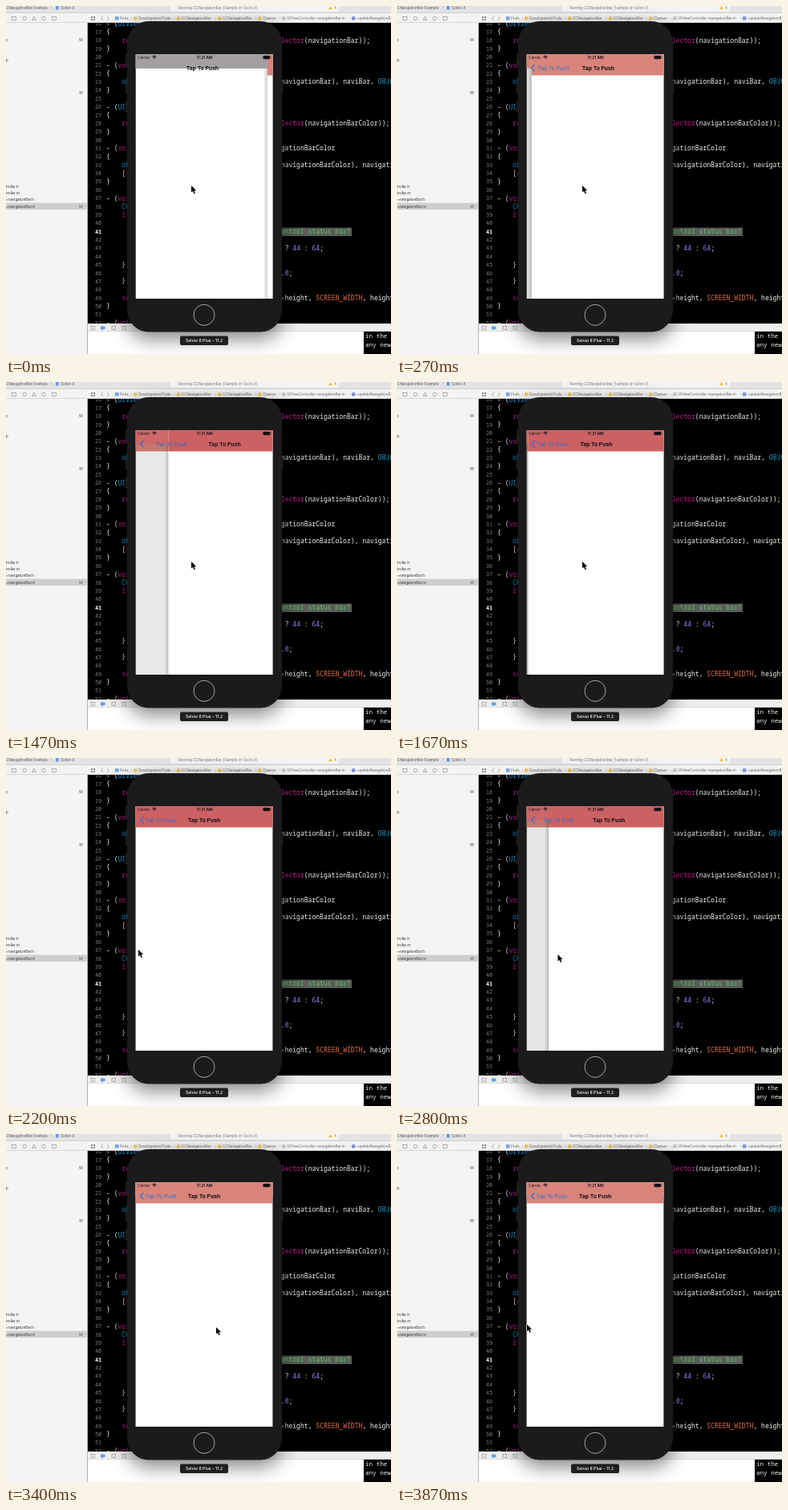
Write an HTML page with a canvas that moves like this. It is 480 by 434 pixels and loops after 4070 ms.

```html
<!DOCTYPE html>
<html lang="en">
<head>
<meta charset="utf-8">
<title>Navigation bar demo</title>
<style>
html, body { margin: 0; width: 100%; height: 100%; overflow: hidden; background: #fff; }
canvas { display: block; width: 480px; height: 434px; }
</style>
</head>
<body>
<canvas id="stage"></canvas>
<script>
const canvas = document.getElementById('stage');
const ctx = canvas.getContext('2d');
const dpr = window.devicePixelRatio || 1;
canvas.width = 480 * dpr;
canvas.height = 434 * dpr;

const LOOP = 4070, FPS = 15;
const SANS = 'Inter, "Liberation Sans", sans-serif';
const MONO = '"Noto Sans Mono", "DejaVu Sans Mono", monospace';
const SCREEN = { x: 161.5, y: 60, w: 171, h: 305 };
const SHARED_H = 18;
const BARS = [
  { color: '#a1a1a1', h: SHARED_H },
  { color: '#d9847b', h: 26.5 },
  { color: '#cc6163', h: 26.5 }
];
const BLUE = '#2b6fd0';
const CELL = 4.84, ROW = 10.37;

const CODE = [
  '- (UIView *)navigationBar', '{',
  '    return objc_getAssociatedObject(self, @selector(navigationBar));', '}', '',
  '- (void)setNavigationBar:(UIView *)naviBar', '{',
  '    objc_setAssociatedObject(self, @selector(navigationBar), naviBar, OBJC_ASSOCIATION_RETAIN);', '}', '',
  '- (UIColor *)navigationBarColor', '{',
  '    return objc_getAssociatedObject(self, @selector(navigationBarColor));', '}', '',
  '- (void)setNavigationBarColor:(UIColor *)navigationBarColor', '{',
  '    objc_setAssociatedObject(self, @selector(navigationBarColor), navigationBarColor);',
  '    [self updateNavigationBar];', '}', '',
  '- (void)updateNavigationBar', '    CGFloat height = 0;', '    if (self) {', '',
  ' '.repeat(41) + '// control status bar!', '',
  ' '.repeat(46) + '? 44 : 64;', '', '    }',
  ' '.repeat(44) + '0.0;', '    }', '',
  '    self' + ' '.repeat(37) + '-height, SCREEN_WIDTH, height);', '}', '',
  '- (void)viewDidLoad'
];

const clamp = v => Math.max(0, Math.min(1, v));

function rect(x, y, w, h, color) {
  ctx.fillStyle = color;
  ctx.fillRect(x, y, w, h);
}

function round(x, y, w, h, r, color) {
  ctx.fillStyle = color;
  ctx.beginPath();
  ctx.roundRect(x, y, w, h, r);
  ctx.fill();
}

function line(points, color, width = 1) {
  ctx.strokeStyle = color;
  ctx.lineWidth = width;
  ctx.beginPath();
  points.forEach(([x, y]) => ctx.lineTo(x, y));
  ctx.stroke();
}

function ring(x, y, r, color, width = 0.7) {
  ctx.strokeStyle = color;
  ctx.lineWidth = width;
  ctx.beginPath();
  ctx.arc(x, y, r, 0, 7);
  ctx.stroke();
}

function text(str, x, y, size, color, align = 'left', weight = 400, family = SANS) {
  ctx.font = `${weight} ${size}px ${family}`;
  ctx.fillStyle = color;
  ctx.textAlign = align;
  ctx.textBaseline = 'alphabetic';
  ctx.fillText(str, x, y + size * 0.36);
}

function tokenColor(token) {
  if (token.startsWith('//')) return '#5cc463';
  if (/^(void|return|self|if|@selector)$/.test(token)) return '#d6219a';
  if (/^(UI|CG|OBJC_|objc_)/.test(token)) return '#16a5e0';
  if (/^SCREEN_/.test(token)) return '#ee7048';
  if (/^\d/.test(token)) return '#8b87ff';
  return '#f2f2f2';
}

function drawCode() {
  rect(102, 21, 378, 376, '#000');
  rect(330, 276.5, 101, 10.5, '#5b5b5b');
  CODE.forEach((src, i) => {
    const y = 22 + i * ROW, current = i === 25;
    text(16 + i, 111, y, 6.8, current ? '#fff' : '#808080', 'left', current ? 700 : 400, MONO);
    let col = 0;
    for (const token of src.match(/\/\/.*|@?\w+|\s+|./g) || []) {
      text(token, 125 + col * CELL, y, 8.06, tokenColor(token), 'left', 500, MONO);
      col += token.length;
    }
  });
}

function drawSidebar() {
  rect(0, 21, 101, 413, '#f5f4f5');
  rect(0, 245.5, 101, 8.5, '#cfcfcf');
  [['c', 42], ['p', 67], ['troller.h', 225], ['troller.m', 233],
   ['+navigationBar.h', 241], ['+navigationBar.m', 250]]
    .forEach(([name, y]) => text(name, 0, y, 4.4, '#333'));
  [42, 108, 250].forEach(y => text('M', 91.3, y, 4.8, '#777', 'left', 600));
  rect(101, 8, 1, 426, '#b5b5b5');
}

function drawToolbars() {
  rect(0, 0, 480, 9, '#e4e3e4');
  round(205, -4, 210, 11, 2, '#f4f4f4');
  text('CCNavigationBar-Example', 52, 2, 4.4, '#555', 'right');
  text('›', 56, 2, 5, '#888');
  rect(62, 0, 3.5, 4.5, '#5c98e0');
  text('Selvio X', 68, 2, 4.6, '#555');
  text('Running CCNavigationBar_Example on Selvio X', 264, 2, 4.4, '#777', 'center');
  ctx.fillStyle = '#f2c03a';
  ctx.beginPath();
  ctx.moveTo(402, 4); ctx.lineTo(404.5, 0); ctx.lineTo(407, 4);
  ctx.fill();
  text('4', 409, 2, 4.4, '#777');
  rect(0, 8.5, 480, 0.7, '#c0c0c0');
  rect(0, 9, 480, 12, '#f4f3f4');

  [10, 23, 35, 47, 60].forEach((x, i) => {
    if (i === 2) line([[x - 2.5, 17.5], [x, 13], [x + 2.5, 17.5], [x - 2.5, 17.5]], '#909090', 0.7);
    else if (i % 2) ring(x, 15.5, 2.3, '#909090');
    else { ctx.strokeStyle = '#909090'; ctx.lineWidth = 0.7; ctx.strokeRect(x - 2.5, 13.5, 5, 4); }
  });
  [106, 109].forEach(x => [13, 16].forEach(y => rect(x, y, 2, 2, '#888')));
  line([[121, 13], [118.5, 15.5], [121, 18]], '#888', 0.8);
  line([[126, 13], [128.5, 15.5], [126, 18]], '#888', 0.8);
  [['Pods', 142, '#6ba1e4'], ['Development Pods', 165, '#e9cc6c'], ['CCNavigationBar', 219, '#e9cc6c'],
   ['CCNavigationBar', 270, '#e9cc6c'], ['Classes', 320, '#e9cc6c'],
   ['UIViewController+navigationBar.m', 350, '#c4c4cc'], ['-updateNavigationBar', 437, '#7794d8']]
    .forEach(([name, x, color], i) => {
      rect(x - 6, 13.2, 4.5, 4.3, color);
      text(name, x, 15.6, 4.5, '#666');
      if (i) text('›', x - 9.5, 15.2, 5, '#999');
    });
  rect(0, 20.5, 480, 0.5, '#bbb');
}

function drawDebugArea() {
  rect(102, 396, 378, 10, '#efeeef');
  rect(102, 406, 344, 28, '#fff');
  rect(446, 406, 34, 28, '#000');
  rect(102, 405.5, 378, 0.5, '#c4c4c4');
  ctx.strokeStyle = '#909090';
  ctx.lineWidth = 0.7;
  [106, 132, 145].forEach(x => ctx.strokeRect(x, 399.5, 4.5, 4));
  ctx.fillStyle = '#5a9eea';
  ctx.beginPath();
  ctx.moveTo(118, 399.5); ctx.lineTo(122, 399.5); ctx.lineTo(124.5, 401.5);
  ctx.lineTo(122, 403.5); ctx.lineTo(118, 403.5);
  ctx.fill();
  text('in the', 448, 411, 7.6, '#eee', 'left', 500, MONO);
  text('any newer', 448, 422, 7.6, '#eee', 'left', 500, MONO);
}

function drawPhone() {
  [[149, 60, 17], [149, 94, 15], [149, 118, 15], [343, 93, 17]]
    .forEach(([x, y, h]) => round(x, y, 2.5, h, 1, '#29282a'));
  ctx.save();
  ctx.shadowColor = 'rgba(0,0,0,.5)';
  ctx.shadowBlur = 24 * dpr;
  ctx.shadowOffsetY = 8 * dpr;
  round(151, 19, 193, 387.5, 27, '#1b1a1c');
  ctx.restore();
  ring(247, 385.3, 13, '#a4a4a4', 1);
  round(217, 411.5, 60, 11.5, 2, '#1e1e1e');
  text('Selvio 8 Plus – 11.2', 247, 417.3, 5.2, '#fff', 'center', 500);
}

function drawPage(index, x) {
  const bar = BARS[index];
  rect(x, SCREEN.y, SCREEN.w, SCREEN.h, '#fff');
  rect(x, SCREEN.y, SCREEN.w, bar.h, bar.color);
}

function drawStatus() {
  text('Carrier', 164, 64.3, 4.7, '#111');
  [1.2, 2.6, 4].forEach(r => {
    ctx.strokeStyle = '#111';
    ctx.lineWidth = 0.9;
    ctx.beginPath();
    ctx.arc(185, 66.3, r, -2.3, -0.84);
    ctx.stroke();
  });
  text('11:21 AM', 247.5, 64.3, 4.9, '#111', 'center', 600);
  round(320.5, 62, 8.6, 4.2, 1, '#111');
  rect(329.6, 63.3, 0.7, 1.6, '#111');
}

// p: 1 = top page fully off to the right, 0 = fully in place
function drawScreen(top, p) {
  const { x, y, w, h } = SCREEN, edge = x + p * w;
  ctx.save();
  ctx.beginPath();
  ctx.rect(x, y, w, h);
  ctx.clip();

  drawPage(top - 1, x);
  rect(x, y, w, h, `rgba(0,0,0,${0.12 * (1 - p)})`);
  if (p < 1 && p > 0.002) {
    const shade = ctx.createLinearGradient(edge - 5, 0, edge, 0);
    shade.addColorStop(0, 'rgba(0,0,0,0)');
    shade.addColorStop(1, 'rgba(0,0,0,.2)');
    rect(edge - 5, y, 5, h, shade);
  }
  // The shared bar stays put and blends from the lower page's colour to the upper one's
  rect(x, y, w, SHARED_H, BARS[top - 1].color);
  ctx.globalAlpha = 1 - p;
  rect(x, y, w, SHARED_H, BARS[top].color);
  ctx.globalAlpha = 1;
  drawPage(top, edge);
  drawStatus();

  const shown = clamp((0.5 - p) / 0.28);
  const label = (cx, alpha, color, weight) => {
    ctx.globalAlpha = alpha;
    text('Tap To Push', cx, 77.4, weight > 400 ? 6.8 : 6.7, color, 'center', weight);
  };
  label(247 + p * 106, shown, '#111', 700);
  label(193 + p * 54, shown, BLUE, 400);
  label(193 + p * 54, clamp((p - 0.2) / 0.6), '#111', 700);
  if (top === 2) label(139 + p * 54, clamp((p - 0.25) / 0.55), BLUE, 400);
  ctx.globalAlpha = top === 2 ? 1 : shown;
  line([[171.5, 73], [167.5, 77.2], [171.5, 81.4]], BLUE, 1.2);
  ctx.restore();
}

function drawCursor(x, y) {
  ctx.beginPath();
  [[0, 0], [0, 8.6], [2, 6.8], [3.4, 10], [4.9, 9.4], [3.5, 6.3], [6.1, 6.1]]
    .forEach(([dx, dy]) => ctx.lineTo(x + dx, y + dy));
  ctx.closePath();
  ctx.strokeStyle = '#fff';
  ctx.lineWidth = 1;
  ctx.stroke();
  ctx.fillStyle = '#000';
  ctx.fill();
}

// Linear interpolation through [tick, ...values]
function track(keys, k) {
  const i = keys.findIndex(key => key[0] > k);
  if (i < 0) return keys[keys.length - 1].slice(1);
  if (i === 0) return keys[0].slice(1);
  const a = keys[i - 1], b = keys[i], u = (k - a[0]) / (b[0] - a[0]);
  return a.slice(1).map((v, j) => v + (b[j + 1] - v) * u);
}

const POINTER = [
  [27, 231, 224], [33, 165, 239], [36, 165, 239], [39, 176, 241], [42, 200.5, 245],
  [46, 255, 257.5], [48, 282, 254], [51, 262, 241], [57, 156, 236], [58, 162, 237.5]
];
const SWIPE = [
  [35, 0], [38, 4], [40, 12], [42, 27.5], [44, 48], [46, 71.5],
  [47, 97], [48, 132], [49, 155], [50, 166], [51, 171]
];

// Critically damped spring, as used by the push transition
const spring = s => s < 0 ? 1 : (1 + 18 * s) * Math.exp(-18 * s);

function draw(ms) {
  const k = Math.floor((ms + 4) * FPS / 1000), s = k / FPS;
  ctx.setTransform(dpr, 0, 0, dpr, 0, 0);
  drawCode();
  drawDebugArea();
  drawSidebar();
  drawToolbars();
  drawPhone();
  if (k < 20) drawScreen(1, spring(s + 0.017));
  else if (k < 35) drawScreen(2, spring(s - 1.314));
  else if (k < 51) drawScreen(2, track(SWIPE, k)[0] / SCREEN.w);
  else drawScreen(1, 0);
  drawCursor(...track(POINTER, k));
}

let start;
function tick(now) {
  start ??= now;
  draw((now - start) % LOOP);
  requestAnimationFrame(tick);
}
draw(0);
requestAnimationFrame(tick);
</script>
</body>
</html>
```
